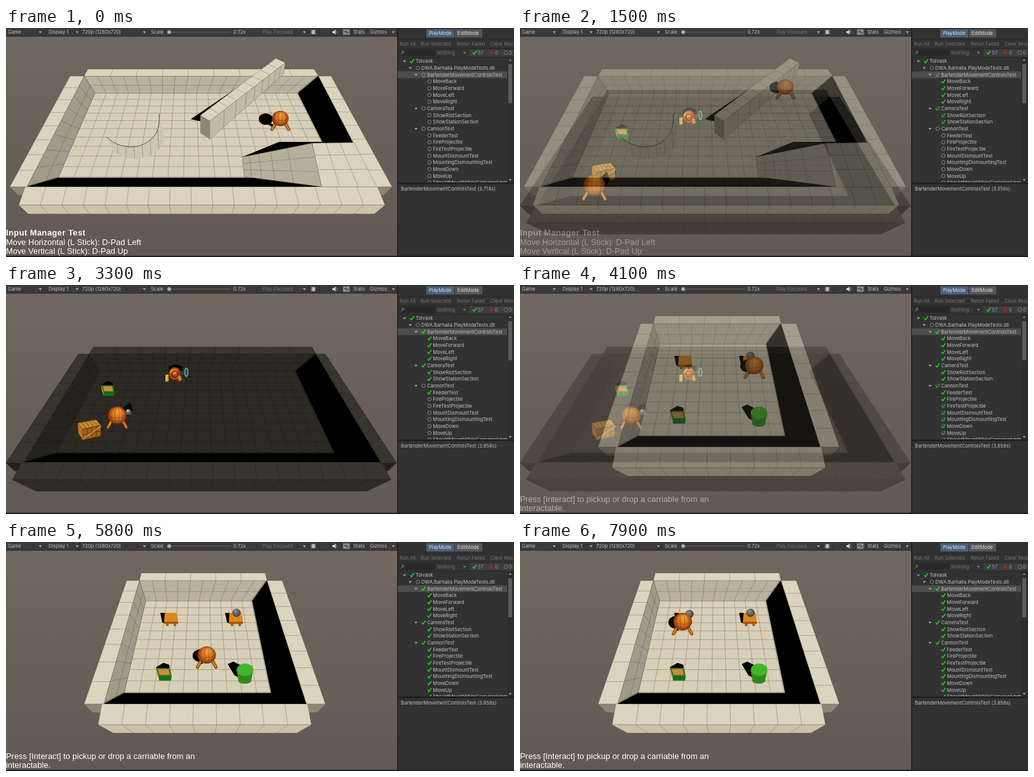
These frames come from a looping animation (800 px wide and 362 px high, 8000 ms). An HTML page with a canvas:

```html
<!DOCTYPE html>
<html lang="en">
<head>
<meta charset="utf-8">
<title>Play mode tests</title>
<style>
html, body { margin: 0; width: 800px; height: 362px; overflow: hidden; background: #323232; }
canvas { display: block; }
</style>
</head>
<body>
<canvas id="stage" width="800" height="362"></canvas>
<script>
const LOOP = 8000;
const screen2d = document.getElementById('stage').getContext('2d');
const layer = document.createElement('canvas');
layer.width = 800;
layer.height = 362;
const layer2d = layer.getContext('2d');
let c = screen2d;

// ---------- drawing helpers ----------
function poly(p, fill) {
  c.beginPath();
  for (let i = 0; i < p.length; i += 2) c.lineTo(p[i], p[i + 1]);
  c.closePath();
  c.fillStyle = fill;
  c.fill();
}

function stroke(p, color, width = 1) {
  c.beginPath();
  for (let i = 0; i < p.length; i += 2) c.lineTo(p[i], p[i + 1]);
  c.strokeStyle = color;
  c.lineWidth = width;
  c.stroke();
}

function rect(x, y, w, h, fill) {
  c.fillStyle = fill;
  c.fillRect(x, y, w, h);
}

function oval(x, y, rx, ry, fill) {
  c.beginPath();
  c.ellipse(x, y, rx, ry, 0, 0, 7);
  c.fillStyle = fill;
  c.fill();
}

function ring(x, y, r, color, width = 0.8) {
  c.beginPath();
  c.arc(x, y, r, 0, 7);
  c.strokeStyle = color;
  c.lineWidth = width;
  c.stroke();
}

function text(s, x, y, color = '#c0c0c0', font = '7.6px Inter, sans-serif') {
  c.font = font;
  c.fillStyle = color;
  c.fillText(s, x, y);
}

function arrow(x, y, color = '#aaa', s = 2.4) {
  poly([x - s, y - s / 2, x + s, y - s / 2, x, y + s * 0.8], color);
}

// Maps the unit square onto a quad in perspective.
function projector([x0, y0, x1, y1, x2, y2, x3, y3]) {
  const ax = x1 - x2, ay = y1 - y2, bx = x3 - x2, by = y3 - y2;
  const sx = x0 - x1 + x2 - x3, sy = y0 - y1 + y2 - y3;
  const den = ax * by - bx * ay;
  const g = (sx * by - bx * sy) / den, h = (ax * sy - sx * ay) / den;
  return (u, v) => {
    const w = g * u + h * v + 1;
    return [((x1 - x0 + g * x1) * u + (x3 - x0 + h * x3) * v + x0) / w,
            ((y1 - y0 + g * y1) * u + (y3 - y0 + h * y3) * v + y0) / w];
  };
}

function tiles(p, cols, rows, fill, line) {
  poly(p, fill);
  const at = projector(p);
  for (let i = 0; i <= cols; i++) stroke([...at(i / cols, 0), ...at(i / cols, 1)], line, 0.8);
  for (let j = 0; j <= rows; j++) stroke([...at(0, j / rows), ...at(1, j / rows)], line, 0.8);
}

// Position on a path of [time, x, y] stops.
function along(stops, t) {
  let a = stops[0];
  for (const b of stops) {
    if (t < b[0]) {
      const k = Math.max(0, (t - a[0]) / (b[0] - a[0] || 1));
      return [a[1] + (b[1] - a[1]) * k, a[2] + (b[2] - a[2]) * k];
    }
    a = b;
  }
  return [a[1], a[2]];
}

// ---------- rooms ----------
const LIGHT = { top: '#dcd4be', floor: '#d8cfb9', back: '#b9b29e', side: '#a29b89',
                front: '#cbc2a8', corner: '#8d8675', line: 'rgba(80,70,52,.42)' };
const DARK = { top: '#38352f', floor: '#2d2a25', back: '#2c2923', side: '#26231f',
               front: '#2f2c27', corner: '#24211d', line: 'rgba(12,10,8,.3)' };

// Each edge is [left x, right x, y].
const BIG = {
  rear: [129, 485, 65], rim: [123, 492, 76], far: [140, 460, 103], near: [82, 527, 237],
  edge: [33, 583, 251], outFar: [101, 512, 76], outNear: [6, 608, 251],
  lip: [20, 597, 280], foot: [35, 580, 294], cols: 18, rows: 8
};
const WIDE = {
  rear: [137, 482, 98], rim: [131, 488, 109], far: [148, 456, 136], near: [80, 518, 266],
  edge: [28, 590, 280], outFar: [114, 503, 109], outNear: [0, 615, 281],
  lip: [10, 606, 308], foot: [48, 568, 326], cols: 18, rows: 8
};
const SMALL = {
  rear: [213, 408, 49], rim: [210, 411, 61], far: [220, 388, 93], near: [186, 418, 239],
  edge: [154, 473, 256], outFar: [190, 435, 61], outNear: [123, 503, 256],
  lip: [145, 481, 289], foot: [169, 458, 302], cols: 10, rows: 8
};

const span = (a, b) => [a[0], a[2], a[1], a[2], b[1], b[2], b[0], b[2]];

function room(r, m) {
  const strip = (s, a, b, d, e) => [a[s], a[2], b[s], b[2], d[s], d[2], e[s], e[2]];
  tiles(span(r.far, r.near), r.cols, r.rows + 2, m.floor, m.line);
  tiles(span(r.rim, r.far), r.cols, 2, m.back, m.line);
  tiles(strip(0, r.rim, r.far, r.near, r.edge), 2, r.rows, m.side, m.line);
  c.save();
  c.shadowColor = '#000';
  c.shadowBlur = 3;
  poly([r.far[1], r.far[2], r.rim[1], r.rim[2], r.edge[1], r.edge[2], r.edge[0], r.edge[2],
        r.near[0], r.near[2], r.near[1], r.near[2]], '#000');
  c.restore();
  for (const s of [0, 1]) {
    const dir = s ? -1 : 1, y = r.outNear[2];
    poly([r.outNear[s], y, r.edge[s], y, r.edge[s], y + 14, r.outNear[s] + 13 * dir, y + 13], m.corner);
    tiles(strip(s, r.outFar, r.rim, r.edge, r.outNear), 1, r.rows, m.top, m.line);
  }
  tiles(span(r.rear, r.rim), r.cols / 2, 1, m.top, m.line);
  const inner = [r.edge[0] - 3, r.edge[1] + 2, r.edge[2]];
  tiles(span(inner, r.lip), r.cols - 1, 1, m.top, m.line);
  tiles(span(r.lip, r.foot), r.cols - 1, 1, m.front, m.line);
}

// ---------- props ----------
function ball(x, y, r = 6.5) {
  const g = c.createRadialGradient(x - 2, y - 3, 1, x, y, r);
  g.addColorStop(0, '#8a8a86');
  g.addColorStop(1, '#3f3f3d');
  oval(x, y, r, r, g);
}

function hero(x, y, r = 14, shade = 0) {
  if (shade) {
    oval(x - shade, y + 1, r * 0.85, r * 0.7, '#000');
    stroke([x - shade, y + 5, x - 8, y + 14], '#000', 4);
  }
  c.lineCap = 'round';
  for (const d of [-1, 1]) {
    stroke([x + d * r * 0.6, y + r * 0.6, x + d * r, y + r * 1.32], '#7a3208', 5);
    stroke([x + d * r * 0.6, y + r * 0.6, x + d * r, y + r * 1.3], '#dd7a20', 3);
  }
  c.lineCap = 'butt';
  const g = c.createRadialGradient(x + 2, y - r * 0.5, 1, x, y, r * 1.05);
  g.addColorStop(0, '#f0a040');
  g.addColorStop(0.6, '#cf6a1c');
  g.addColorStop(1, '#6e2c08');
  oval(x, y, r, r * 0.94, g);
  for (const k of [0.25, 0.7]) {
    c.beginPath();
    c.ellipse(x, y, r * k, r * 0.9, 0, 0, 7);
    c.strokeStyle = 'rgba(90,35,5,.45)';
    c.lineWidth = 0.8;
    c.stroke();
  }
  c.beginPath();
  c.ellipse(x, y - 1, r * 0.95, r * 0.35, 0, 0, Math.PI);
  c.stroke();
}

function table(x, y) {
  poly([x - 17, y - 9, x - 9, y - 9, x - 9, y + 8, x - 14, y + 6], '#000');
  for (const d of [-6, 6]) rect(x + d - 2, y + 6, 4, 6, '#b45f10');
  poly([x - 10, y - 9, x + 9, y - 9, x + 11, y + 5, x - 11, y + 5], '#dc861f');
  rect(x - 11, y + 5, 22, 3.5, '#a2580f');
}

function feeder(x, y, w, hot) {
  const s = w / 24;
  c.save();
  c.translate(x, y);
  c.scale(s, s);
  poly([-12, -10, 0, -17, 9, -14, 10, -8, -8, 5], '#000');
  poly([-12, -9, 10, -9, 13, 4, -8, 4], hot ? '#8ad9c3' : '#2d7a28');
  poly([-9, -7, 8, -7, 10, 2, -6, 2], hot ? '#a9ead8' : '#d38a3a');
  poly([-8, 4, 13, 4, 12, 11, -7, 11], hot ? '#5ca890' : '#11701b');
  poly([-12, -9, -8, 4, -7, 11, -11, 0], hot ? '#4f9580' : '#d8b321');
  c.restore();
}

function crate() {
  poly([142, 216, 149, 219, 152, 229, 148, 234], '#000');
  tiles([113, 218, 142, 213, 150, 222, 120, 228], 5, 1, '#c8882e', '#6a400e');
  tiles([120, 228, 150, 222, 149, 239, 121, 245], 4, 2, '#9c611a', '#55330b');
  poly([113, 218, 120, 228, 121, 245, 114, 234], '#b87520');
  stroke([121, 244, 150, 223], '#d79a44', 1.5);
}

function cannon() {
  poly([256, 130, 266, 125, 278, 129, 276, 138, 258, 137], '#000');
  oval(266, 140, 9, 10, '#b8480f');
  oval(264, 137, 6, 4, '#ee8a2c');
  ring(266, 141, 5, '#4d1b05', 1.5);
  poly([251, 142, 256, 141, 256, 152, 251, 153], '#e0ad28');
  poly([270, 145, 275, 143, 277, 150, 272, 152], '#dc7a20');
  stroke([273, 139, 282, 139], '#3c3730', 6);
  oval(284, 138, 3.3, 7.5, '#6a9c8f');
  oval(284, 138, 1.6, 5, '#26453e');
}

function cylinder() {
  poly([349, 193, 358, 189, 372, 196, 370, 216, 360, 211], '#000');
  poly([363, 201, 389, 203, 386, 220, 366, 220], '#2c8a1c');
  oval(376, 220, 10, 4, '#2c8a1c');
  oval(376.5, 202, 13, 10, '#42b52a');
}

// ---------- scenes ----------
function caption(s, y, bold) {
  c.letterSpacing = bold ? '.45px' : '0px';
  text(s, 0, y, '#fff', (bold ? 'bold ' : '') + '12.9px "Liberation Sans", Arial, sans-serif');
  c.letterSpacing = '0px';
}

function moveScene(t) {
  const m = LIGHT;
  room(BIG, m);
  // raised platform on the right
  poly([372, 204, 430, 180, 500, 180, 480, 190], '#000');
  tiles([482, 182, 548, 181, 584, 251, 497, 251], 3, 3, m.top, m.line);
  tiles([372, 204, 482, 182, 497, 251, 375, 235], 5, 3, '#b6af9c', m.line);
  // curved wall
  const curve = new Path2D('M158 172Q178 192 208 187Q245 176 241 136L249 173Q246 202 205 207Q177 206 167 190Z');
  c.fillStyle = '#cdc5b0';
  c.fill(curve);
  c.save();
  c.clip(curve);
  for (let x = 172; x < 250; x += 13) stroke([x, 130, x + 5, 210], m.line, 0.8);
  c.restore();
  c.strokeStyle = '#39342b';
  c.lineWidth = 0.8;
  c.stroke(new Path2D('M158 172Q178 192 208 187Q245 176 241 136'));
  // beam
  poly([291, 144, 391, 76, 402, 72, 308, 148], '#000');
  tiles([306, 138, 425, 48, 440, 55, 321, 147], 9, 1, m.top, m.line);
  tiles([321, 147, 440, 55, 437, 73, 321, 176], 9, 1, '#c2baa5', m.line);
  poly([306, 138, 321, 147, 321, 176, 306, 166], '#8e8777');
  const [x, y] = along([[0, 432, 143], [100, 432, 143], [600, 418, 93]], t);
  hero(x, y, 13, 23 - 9 * Math.min(1, t / 600));
  caption('Input Manager Test', 328, true);
  caption('Move Horizontal (L Stick): D-Pad Left', 343);
  caption('Move Vertical (L Stick): D-Pad Up', 357);
}

function cannonScene(t) {
  room(WIDE, DARK);
  cannon();
  feeder(160, 166, 20);
  crate();
  const [x, y] = along([[1800, 117, 248], [2500, 160, 193], [2900, 160, 193], [3200, 175, 206]], t);
  poly([x + 8, y - 10, x + 20, y - 21, x + 25, y - 8, x + 18, y + 2], '#0a0908');
  hero(x, y, t < 1800 ? 17 : 14.5);
  if (t > 1800) {
    ball(x + 18, y - 5, 5);
    oval(x + 17, y - 7, 2, 1.5, '#b9c6d2');
  }
}

function pickupScene(t) {
  room(SMALL, LIGHT);
  table(260, 121);
  table(362, 121);
  ball(363, 112);
  feeder(248, 208, 24, t > 6500 && t < 6950);
  cylinder();
  const [x, y] = along([[4400, 369, 127], [4900, 256, 126], [5300, 256, 126], [6100, 352, 210],
    [6200, 352, 210], [6600, 241, 226], [6900, 241, 226], [7300, 362, 130],
    [7600, 362, 130], [7900, 256, 126]], t);
  if (t > 7400) ball(x + 11, y - 12);
  hero(x, y, y > 180 ? 16.5 : 14.5, y > 180 ? 0 : 10);
  caption('Press [Interact] to pickup or drop a carriable from an', 343);
  caption('interactable.', 357);
}

// ---------- editor interface ----------
const TREE = [
  '0Tolvask', '1DWA.Barhalla.PlayModeTests.dll', '2BartenderMovementControlsTest',
  '3MoveBack', '3MoveForward', '3MoveLeft', '3MoveRight',
  '2CameraTest', '3ShowRiotSection', '3ShowStationSection',
  '2CannonTest', '3FeederTest', '3FireProjectile', '3FireTestProjectile', '3MountDismountTest',
  '3MountingDismountingTest', '3MoveDown', '3MoveUp', '3ShouldMountWhileCarryingAmmo'
];

function passed(scene, row, t) {
  if (row === 0) return true;
  if (row === 1) return false;
  if (scene === 0) return row > 2 && row < 7 && t > 500 + (row - 3) * 200;
  if (scene === 1) return row < 10 || (row === 11 && t >= 2900) || (row === 12 && t >= 3700);
  return true;
}

function tick(x, y) {
  stroke([x - 3, y, x - 1, y + 2.5, x + 3, y - 3], '#1fd01f', 1.6);
}

function toolbar() {
  rect(0, 0, 617, 13, '#3a3a3a');
  rect(0, 12.5, 617, 1, '#232323');
  const labels = [['Game', 3], ['Display 1', 67], ['720p (1280x720)', 120], ['Scale', 228],
                  ['0.72x', 358], ['Stats', 547], ['Gizmos', 573]];
  for (const [s, x] of labels) text(s, x, 9);
  text('Play Focused', 404, 9, '#777');
  for (const x of [54, 112, 218, 470, 610]) arrow(x, 6.5);
  for (const x of [61, 116, 223, 475, 493, 510, 528, 544, 569]) rect(x, 0, 0.7, 12, '#2a2a2a');
  stroke([257, 6.5, 354, 6.5], '#666');
  oval(257, 6.5, 3, 3, '#aaa');
  oval(484, 6.5, 2.5, 3.6, '#bbb');
  for (const y of [4, 6.5, 9]) stroke([480, y, 488, y], '#bbb', 0.8);
  poly([514, 5, 516, 5, 519, 2.5, 519, 10, 516, 8, 514, 8], '#ddd');
  ring(519, 6.5, 2.5, '#aaa', 0.7);
  rect(530, 1, 12, 11, '#505050');
  c.strokeStyle = '#ccc';
  c.lineWidth = 0.8;
  c.strokeRect(532, 3.5, 8, 6);
  stroke([532, 9, 540, 4], '#ccc', 0.8);
}

function panel(scene, t) {
  rect(616, 0, 184, 362, '#323232');
  rect(616, 0, 1.5, 362, '#1c1c1c');
  rect(662, 2, 44, 13, '#46607c');
  rect(707, 2, 43, 13, '#565656');
  text('PlayMode', 666, 11, '#e0e0e0');
  text('EditMode', 711, 11, '#e0e0e0');
  rect(617, 18, 183, 0.7, '#232323');
  const buttons = [['Run All', 620], ['Run Selected', 653], ['Rerun Failed', 710], ['Clear Results', 763]];
  for (const [s, x] of buttons) text(s, x, 28, '#777');
  rect(617, 32, 183, 0.7, '#232323');
  rect(621, 34, 55, 10, '#282828');
  ring(625, 38, 1.7, '#999');
  stroke([624, 39.5, 622, 42], '#999', 0.8);
  text('Nothing', 679, 42, '#777');
  arrow(722, 39, '#777');
  rect(730, 33.5, 70, 11, '#3e3e3e');
  tick(738, 39);
  text('57', 743, 42, '#999');
  oval(764, 39, 3, 3, '#9b2618');
  text('0', 770, 42, '#999');
  ring(787, 39, 3, '#888');
  text('0', 792, 42, '#999');
  rect(617, 46, 183, 0.7, '#232323');

  c.save();
  c.beginPath();
  c.rect(617, 47, 172, 197);
  c.clip();
  rect(617, 68.5, 172, 10.7, '#4d4d4d');
  TREE.forEach((entry, i) => {
    const depth = +entry[0], y = 52.5 + i * 10.67, x = 639.5 + depth * 9.1;
    if (depth < 3) arrow(x - 12, y, '#999', 2.6);
    if (passed(scene, i, t)) tick(x, y);
    else ring(x, y, 2.8, '#999');
    text(entry.slice(1), 645 + depth * 9.1, y + 2.8);
  });
  c.restore();

  rect(790, 47, 10, 197, '#2d2d2d');
  rect(791, 57, 6, 62, '#5c5c5c');
  poly([791.5, 52, 796.5, 52, 794, 49], '#888');
  arrow(794, 240, '#999');
  rect(617, 244, 183, 3, '#222');
  text(`BartenderMovementControlsTest (${scene ? '3.858' : '3.714'}s)`, 622, 256.5);
}

const SCENES = [moveScene, cannonScene, pickupScene];

function paint(ctx, scene, t) {
  c = ctx;
  const sky = c.createLinearGradient(0, 13, 0, 362);
  sky.addColorStop(0, '#71675f');
  sky.addColorStop(0.5, '#69605a');
  sky.addColorStop(1, '#615954');
  rect(0, 0, 800, 362, sky);
  SCENES[scene](t);
  toolbar();
  panel(scene, t);
  rect(0, 360, 800, 2, '#1f1f1f');
}

// Scene dissolves: [start, end]
const FADES = [[1200, 1700], [3800, 4400]];

function frame(now) {
  const t = now % LOOP;
  const scene = FADES.filter(f => t >= f[1]).length;
  paint(screen2d, scene, t);
  const fade = FADES[scene];
  if (fade && t > fade[0]) {
    paint(layer2d, scene + 1, t);
    screen2d.globalAlpha = (t - fade[0]) / (fade[1] - fade[0]);
    screen2d.drawImage(layer, 0, 0);
    screen2d.globalAlpha = 1;
  }
  requestAnimationFrame(frame);
}
requestAnimationFrame(frame);
</script>
</body>
</html>
```
